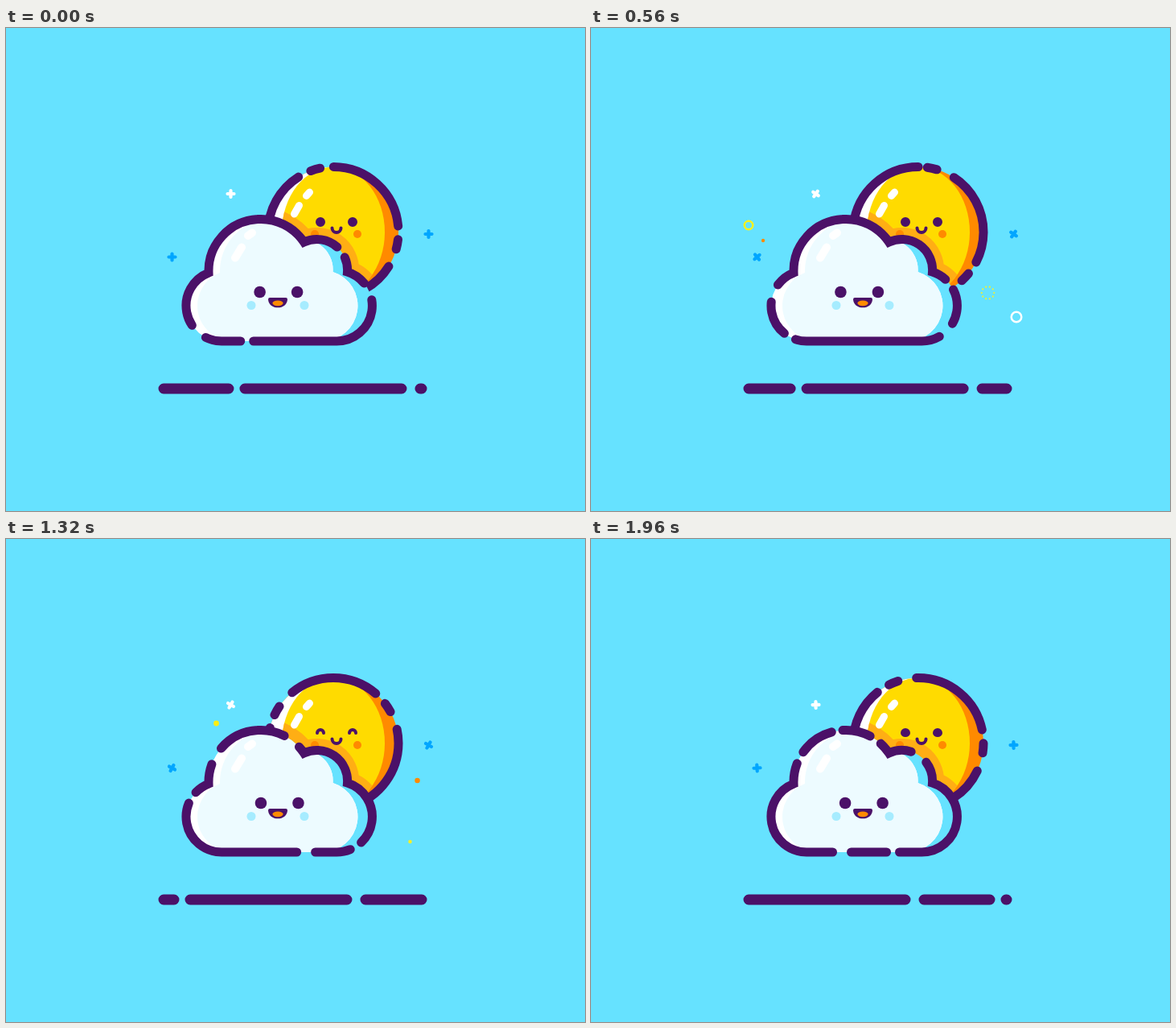
These frames come from a looping animation (720 by 600 pixels, 2000 ms). An HTML page:

```html
<!DOCTYPE html>
<html lang="en">
<head>
<meta charset="utf-8">
<title>Sun and cloud</title>
<style>
html, body { margin: 0; width: 100%; height: 100%; overflow: hidden; background: #66e2ff; }
svg { display: block; }
.line { fill: none; stroke: #4b1168; stroke-width: 11; stroke-linecap: round; }
.shine { fill: none; stroke: #fff; stroke-linecap: round; }
.dark { fill: #4b1168; }
.plus { stroke-width: 4.2; stroke-linecap: round; }
</style>
</head>
<body>
<svg width="720" height="600" viewBox="0 0 720 600">
  <defs>
    <path id="cloud" d="M313 237.6A64.5 64.5 0 0 1 370.5 266A38 38 0 0 1 424.5 303A44 44 0 0 1 411 389H268A44 44 0 0 1 252 304A64.5 64.5 0 0 1 313 237.6"/>
    <clipPath id="inCloud"><use href="#cloud"/></clipPath>
    <clipPath id="inLit"><use href="#cloud" x="-18"/><path d="M200 200H385V400H200Z"/></clipPath>
    <clipPath id="inDisc"><ellipse cx="407" cy="253.5" rx="64" ry="81"/></clipPath>
  </defs>

  <g id="sun">
    <circle cx="407" cy="253.5" r="81" fill="#ff8a00"/>
    <path d="M407 172.5A81 81 0 0 0 407 334.5Z" fill="#fff"/>
    <g clip-path="url(#inDisc)">
      <path d="M326 172H488V335H326Z" fill="#ffdb00"/>
      <use href="#cloud" fill="none" stroke="#ffae14" stroke-width="29"/>
    </g>
    <path class="shine" stroke-width="9" d="M373.5 208.5L377.5 204M358.5 231L364.5 220.5"/>
    <g fill="#ff8a00"><circle cx="384" cy="256" r="5"/><circle cx="437" cy="256" r="5"/></g>
    <g fill="#4b1168" stroke="#4b1168" stroke-width="4" stroke-linecap="round" stroke-linejoin="round">
      <path class="sunEye" transform="translate(391 241)"/>
      <path class="sunEye" transform="translate(431 241)"/>
      <path d="M405.5 248.5a5.5 5.5 0 0 0 11 0" fill="none"/>
    </g>
    <circle id="sunLine" class="line" cx="407" cy="253.5" r="81" pathLength="360" transform="rotate(-90 407 253.5)" stroke-dasharray="84.4 12 8.6 16.5"/>
  </g>

  <use href="#cloud" fill="#66e2ff"/>
  <g clip-path="url(#inCloud)">
    <g clip-path="url(#inLit)">
      <use href="#cloud" fill="#fff"/>
      <use href="#cloud" x="14" fill="#edfbff"/>
    </g>
  </g>
  <path class="shine" stroke-width="10" d="M301 258L306 254.5M285 285.5L293 272.5"/>
  <g fill="#a6ecff"><circle cx="305" cy="344.5" r="5.5"/><circle cx="371" cy="344.5" r="5.5"/></g>
  <g id="eyes" class="dark"><circle cx="0" cy="328" r="7.3"/><circle cx="46.5" cy="328" r="7.3"/></g>
  <path class="dark" d="M328 335H348Q350 335 350 337.2C349.5 343.5 344.5 347.3 338 347.3S326.500 343.500 326 337.200Q326 335 328 335Z"/>
  <ellipse cx="338" cy="341.8" rx="6.600" ry="3.400" fill="#ff8a00"/>
  <use id="cloudLine" href="#cloud" class="line" stroke-dasharray="180 16 44 23"/>

  <path id="ground" class="line" style="stroke-width:13" d="M196 448H517" stroke-dasharray="195 23 82 20"/>
  <g id="sparks"></g>
</svg>
<script>
const LOOP = 2000;
const $ = id => document.getElementById(id);
const clamp = v => Math.max(0, Math.min(1, v));
const sparks = $('sparks');
const sunEyes = document.querySelectorAll('.sunEye');

function add(tag, attrs) {
  const el = document.createElementNS('http://www.w3.org/2000/svg', tag);
  set(el, attrs);
  return sparks.appendChild(el);
}
function set(el, attrs) {
  for (const key in attrs) el.setAttribute(key, attrs[key]);
}

// Piecewise linear value through [time, value] points
function along(points, t) {
  const i = Math.max(1, points.findIndex(p => p[0] >= t));
  const [t0, v0] = points[i - 1], [t1, v1] = points[i];
  return v0 + (v1 - v0) * (t - t0) / (t1 - t0);
}

const steady = [[0, 0], [LOOP, 180]];
const eased = [[0, 0], [360, 25], [760, 45], [1080, 76], [1320, 120], [1560, 168], [LOOP, 180]];
const pluses = [
  [279.5, 206, '#fff', eased],
  [206.5, 284.5, '#00a6ff', steady],
  [525.5, 256, '#00a6ff', eased]
].map(([x, y, stroke, turn]) => ({ x, y, turn, el: add('path', { class: 'plus', stroke, d: 'M-4 0H4M0-4V4' }) }));

// x, y, colour, start, end, size
const rings = [
  [196, 245, '#fff21a', 200, 960, 1],
  [529, 359, '#fff', 200, 960, 1.2]
];
const bursts = [
  [493.500, 329, '#f2f032', 260, 960, 9.500],
  [229, 227.500, '#f28a1c', 660, 1200, 9.500]
];
const dots = [
  [214, 264, '#ff8a00', 240, 800, 2.200],
  [540, 286.500, '#f5f028', 640, 1200, 2.300],
  [502.500, 376, '#f5f028', 960, 1440, 2.300],
  [261.500, 229, '#ffee10', 980, 1760, 3.400],
  [511.500, 300, '#ff8a00', 760, 1610, 3.300]
];
const circles = (list, extra) => list.map(([cx, cy, color, start, end, size]) => ({
  start, end, size,
  el: add('circle', { cx, cy, ...extra(color) })
}));
const outline = stroke => ({ fill: 'none', stroke });
const ringList = circles(rings, outline);
const burstList = circles(bursts, stroke => ({
  ...outline(stroke), pathLength: 10, 'stroke-dasharray': '0 1', 'stroke-linecap': 'round'
}));
const dotList = circles(dots, fill => ({ fill }));

function eachLive(list, t, paint) {
  for (const s of list) {
    const p = (t - s.start) / (s.end - s.start);
    const live = p > 0 && p < 1;
    s.el.style.display = live ? '' : 'none';
    if (live) set(s.el, paint(p, s));
  }
}

function draw(t) {
  set($('sunLine'), { 'stroke-dashoffset': -0.2 - 0.0587 * t });
  set($('cloudLine'), { 'stroke-dashoffset': 69 - 0.0955 * t });
  set($('ground'), { 'stroke-dashoffset': 0.0515 * t - 101 });
  set($('eyes'), { transform: `translate(${314.4 - 4 * Math.cos((t - 600) / 1000 * Math.PI)} 0)` });

  // The lower lid folds upward until only an arch remains
  const shut = clamp((t - 600) / 260) - clamp((t - 1760) / 260);
  const lid = 4 * Math.cos(Math.PI * shut);
  const eye = `M-4 0A4 4 0 0 1 4 0A4 ${Math.max(0.01, Math.abs(lid))} 0 0 ${lid > 0 ? 1 : 0} -4 0Z`;
  sunEyes.forEach(el => set(el, { d: eye }));

  for (const { x, y, turn, el } of pluses)
    set(el, { transform: `translate(${x} ${y}) rotate(${along(turn, t)})` });

  eachLive(ringList, t, (p, s) => ({
    r: s.size * (3.3 + 2.7 * (1 - (1 - p) ** 2)) * clamp(p * 8),
    'stroke-width': 4.2 * (1 - p) ** 0.8
  }));
  eachLive(burstList, t, (p, s) => ({
    r: s.size * (1 - (1 - p) ** 3),
    'stroke-width': 1.2 + 1.2 * clamp(p * 2),
    opacity: clamp((1 - p) * 6)
  }));
  eachLive(dotList, t, (p, s) => {
    const k = Math.min(clamp((t - s.start) / 100), clamp((s.end - t) / 100));
    return { r: s.size * (0.5 + k / 2), opacity: k };
  });
}

function frame() {
  draw(performance.now() % LOOP);
  requestAnimationFrame(frame);
}
frame();
</script>
</body>
</html>
```
